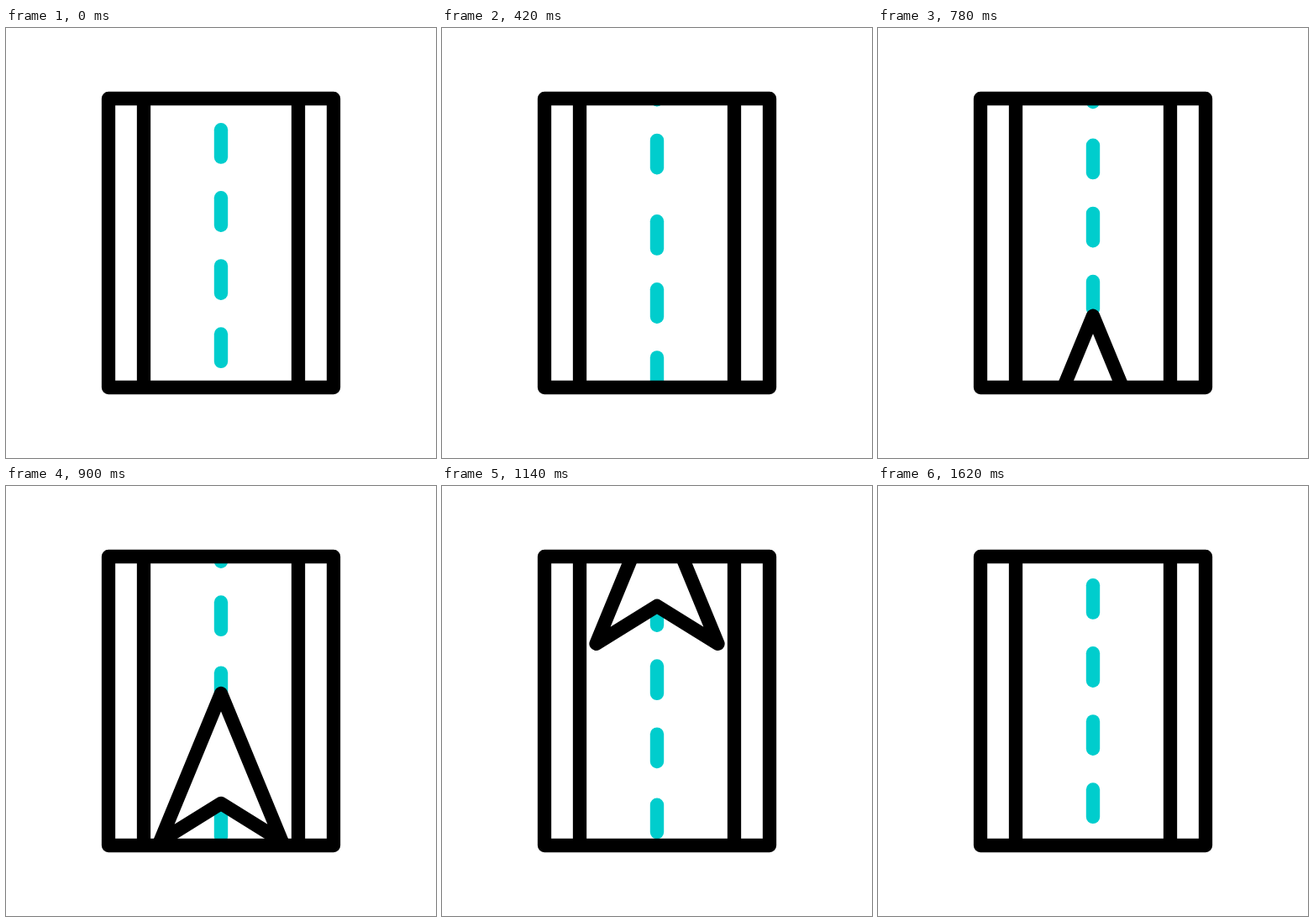
An HTML page that plays this animation: 512 by 512 pixels, repeating every 2040 ms.

```html
<!DOCTYPE html>
<html lang="en">
<head>
<meta charset="utf-8">
<title>Road navigation</title>
<style>
  html, body { margin: 0; width: 100%; height: 100%; overflow: hidden; background: #fff; }
  svg { display: block; width: 100%; height: 100%; }
  .line { fill: none; stroke: #000; stroke-width: 16.3; stroke-linejoin: round; stroke-linecap: round; }
  #arrow { fill: #fff; }
  #dashes { fill: #00cdcd; }
</style>
</head>
<body>
<svg viewBox="0 0 512 512">
  <clipPath id="road"><rect x="164" y="84" width="184" height="344"/></clipPath>
  <g clip-path="url(#road)">
    <g id="dashes"></g>
    <path id="arrow" class="line" d="M256 -176 L328.5 0 L256 -45 L183.5 0 Z"/>
  </g>
  <path class="line" d="M122 84 H390 V428 H122 Z M164 84 V428 M348 84 V428"/>
</svg>
<script>
const LOOP = 2040, STEP = 60, END = 1620;

// [time in ms, position]
const dashTrack = [[0, 0], [420, 109], [660, 277], [900, 441], [1020, 529.5], [1260, 640], [END, 664]];
const arrowTrack = [[600, 612], [660, 587], [900, 423], [1020, 297.3], [1260, 96.3], [1320, 58]];

const dashes = document.getElementById('dashes');
const arrow = document.getElementById('arrow');

// Three groups of four dashes enter one after another.
for (const top of [113, -226.6, -554]) {
  for (let i = 0; i < 4; i++) {
    const dash = document.createElementNS('http://www.w3.org/2000/svg', 'rect');
    const box = { x: 247.8, y: top + i * 81.1, width: 16.4, height: 48.8, rx: 8.2 };
    for (const key in box) dash.setAttribute(key, box[key]);
    dashes.append(dash);
  }
}

const slope = (a, b) => (b[1] - a[1]) / (b[0] - a[0]);

// Tangent at point i, limited so the curve never overshoots.
function tangent(track, i) {
  const prev = track[i - 1], p = track[i], next = track[i + 1];
  if (!prev || !next) return 0;
  const a = slope(prev, p), b = slope(p, next);
  const ha = p[0] - prev[0], hb = next[0] - p[0];
  const m = (a * hb + b * ha) / (ha + hb);
  return Math.sign(m) * Math.min(Math.abs(m), 3 * Math.abs(a), 3 * Math.abs(b));
}

// Smooth Hermite curve through the track.
function sample(track, t) {
  const last = track.length - 1;
  if (t <= track[0][0]) return track[0][1];
  if (t >= track[last][0]) return track[last][1];
  const i = track.findIndex(p => p[0] > t) - 1;
  const [t0, y0] = track[i], [t1, y1] = track[i + 1];
  const h = t1 - t0, u = (t - t0) / h, v = 1 - u;
  return y0 * (1 + 2 * u) * v * v + y1 * u * u * (3 - 2 * u)
    + h * u * v * (tangent(track, i) * v - tangent(track, i + 1) * u);
}

const moveTo = (el, y) => el.setAttribute('transform', `translate(0 ${y.toFixed(2)})`);

function draw(time) {
  const t = Math.min(END, Math.floor(time % LOOP / STEP) * STEP);
  moveTo(dashes, sample(dashTrack, t));
  moveTo(arrow, sample(arrowTrack, t));
}

const start = performance.now();
function tick() {
  draw(performance.now() - start);
  requestAnimationFrame(tick);
}
tick();
</script>
</body>
</html>
```
